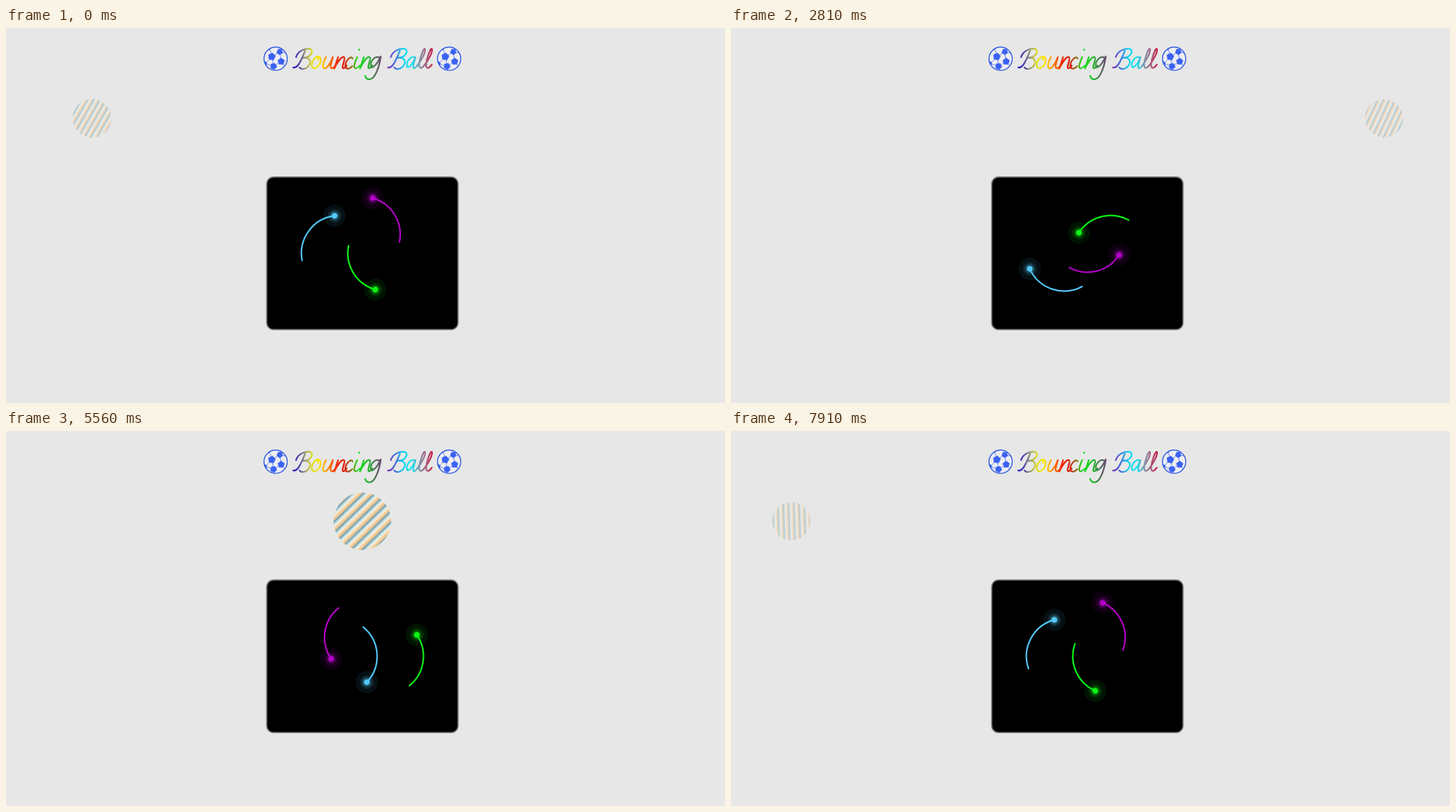
An HTML page that plays this animation: 1036x541 px, repeating every 8 s.

```html
<!DOCTYPE html>
<html lang="en">
<head>
<meta charset="utf-8">
<title>Bouncing Ball</title>
<style>
  html, body { margin: 0; width: 100%; height: 100%; overflow: hidden; background: #e7e7e7; }
  svg { position: absolute; left: 0; top: 0; display: block; }
  h1 {
    position: absolute; left: 413px; top: 24px; margin: 0; white-space: nowrap;
    font: italic 33px/44px Lato, sans-serif; color: transparent;
  }
  .ink { fill: none; stroke: #fff; stroke-width: 2.3; stroke-linecap: round; stroke-linejoin: round; }
</style>
</head>
<body>
<svg width="1036" height="541" viewBox="0 0 1036 541" aria-hidden="true">
  <defs>
    <linearGradient id="rainbow" gradientUnits="userSpaceOnUse" x1="413" y1="0" x2="615" y2="0"></linearGradient>
    <linearGradient id="stripes" gradientUnits="userSpaceOnUse" x1="0" y1="0" x2="7.600" y2="0" spreadMethod="repeat">
      <stop offset="0" stop-color="#f2efe2"/>
      <stop offset=".27" stop-color="#fac888"/>
      <stop offset=".4" stop-color="#e2c29a"/>
      <stop offset=".58" stop-color="#6f9fb0"/>
      <stop offset=".8" stop-color="#c6e0e2"/>
      <stop offset="1" stop-color="#f2efe2"/>
    </linearGradient>
    <clipPath id="round"><circle r="17"/></clipPath>
    <mask id="lettering" maskUnits="userSpaceOnUse" x="405" y="20" width="220" height="65">
      <g class="ink" id="title"></g>
    </mask>
    <g id="soccer">
      <circle r="16.8" fill="#ededf0"/>
      <g id="patches" clip-path="url(#round)" fill="#3b62f3" stroke="#3b62f3" stroke-width=".7"></g>
      <circle r="16.8" fill="none" stroke="#2f5be0" stroke-width="1.4"/>
    </g>
    <path id="capB" d="M0 57C6 58 10 50 17 33M4 42C6 34 16 29 23 30C31 31 26 43 14 43C24 42 26 48 23 53C20 59 12 61 9 57"/>
    <path id="n" d="M5.500 42L0 58.500C4 50 10 41 14 42C17 43 11 55 12 57C13 59.500 16 57 18 54"/>
    <path id="l" d="M0 54C7 46 13 33 11 30C9 28 2 48 3 55C4 60 8 57 11 53"/>
  </defs>

  <use href="#soccer" x="388.500" y="44.300"/>
  <use href="#soccer" x="638.500" y="44.300"/>
  <rect x="405" y="20" width="220" height="65" fill="url(#rainbow)" mask="url(#lettering)"/>

  <g id="ball"><circle r="27.500" fill="url(#stripes)"/></g>

  <rect x="375.600" y="214.800" width="275.800" height="220.400" rx="10" fill="#000" stroke="#808080" stroke-width="1.700"/>
  <g id="orbits"></g>
</svg>
<h1>Bouncing Ball</h1>

<script>
const NS = 'http://www.w3.org/2000/svg';
const $ = id => document.getElementById(id);
function add(parent, tag, attrs) {
  const el = document.createElementNS(NS, tag);
  for (const k in attrs) el.setAttribute(k, attrs[k]);
  return parent.appendChild(el);
}

// Title colours along its width
[[0, '#2418c8'], [.05, '#5048a8'], [.09, '#9a9a70'], [.14, '#e0e01c'], [.19, '#fbe800'],
 [.24, '#ff9a00'], [.31, '#f52a00'], [.37, '#e01808'], [.42, '#8a7010'], [.46, '#20e020'],
 [.53, '#1cc424'], [.58, '#467a50'], [.63, '#6a4a70'], [.69, '#7038c0'], [.74, '#3c7ae0'],
 [.79, '#10d8f0'], [.85, '#14e4f0'], [.9, '#7a98b0'], [.95, '#a86080'], [1, '#c81440']]
  .forEach(([offset, color]) => add($('rainbow'), 'stop', { offset, 'stop-color': color }));

// Title lettering
const title = $('title');
const glyph = (id, x) => add(title, 'use', { href: '#' + id, x });
const pen = d => add(title, 'path', { d });
glyph('capB', 414);
pen('M452 42C446 38 439 50 441 56C443 61 453 56 453.500 46C453 40 447 43 450 46');
pen('M461 42C458 48 455 56 458 58C462 60 468 50 471 42C469 49 466 57 469 58C471 59 473 56 474 55');
glyph('n', 473);
pen('M499.500 44C498 39 490 46 489 53C488 60 494 60 499 55');
pen('M506 42C503 49 500 57 503 58C505 59 508 56 510 54M509 31L508.800 31.800');
glyph('n', 510);
pen('M538 43C532 39 525 48 525.500 54C526 61 534 54 540 41C538 55 532 75 523 74C519 74 518 71 517.500 69');
glyph('capB', 550.5);
pen('M589 43C584 39 577 48 577.500 54C578 61 586 53 590 42C588 50 585 58 588 58C590 58 592 55 593 54');
glyph('l', 592.5);
glyph('l', 602.5);

// Soccer icon patches: x, y, radius, turn
[[-5.5, -3, 5.4, 10], [6, -10, 4.4, 40], [8, 4, 5, 0], [-3, 11, 4.8, 25], [-16, 7, 3.6, 0], [-10, -16, 3.4, 20], [16, 14, 3, 0]]
  .forEach(([x, y, r, turn]) => {
    const points = [0, 1, 2, 3, 4].map(i => {
      const a = (turn + i * 72 - 90) * Math.PI / 180;
      return (x + r * Math.cos(a)).toFixed(1) + ',' + (y + r * Math.sin(a)).toFixed(1);
    }).join(' ');
    add($('patches'), 'polygon', { points });
  });
add($('patches'), 'path', { d: 'M-5 -3L6 -10L8 4L-3 11L-5 -3L-15 7L-3 11M-5 -3L-9 -15M6 -10L15 -8M8 4L15 13', fill: 'none' });

// Orbiting lights: dir 1 is clockwise, sweep is the trail in degrees
const R = 54.5;
const lights = [
  { x: 513.5, y: 297.8, color: '#b400c8', start: -74, dir: -1, sweep: 85.5 },
  { x: 480.2, y: 325, color: '#52c8fa', start: -97.2, dir: 1, sweep: 94 },
  { x: 547, y: 325, color: '#0cf514', start: 106, dir: -1, sweep: 85.5 }
];
for (const s of lights) {
  s.el = add($('orbits'), 'g', { fill: s.color });
  const a = s.sweep * Math.PI / 180;
  add(s.el, 'path', {
    d: `M${R} 0A${R} ${R} 0 0 0 ${R * Math.cos(a)} ${-R * Math.sin(a)}`,
    fill: 'none', stroke: s.color, 'stroke-width': 2.2, 'stroke-linecap': 'round'
  });
  [[16, .08], [10, .11], [7, .24], [4.2, 1]]
    .forEach(([r, o]) => add(s.el, 'circle', { cx: R, r, 'fill-opacity': o }));
}

// Ball steps: time, x, radius, opacity, turn
const LOOP = 8000, LEAD = 90, TILT = -2;
const steps = [
  [0, 86.5, 27.5, .45, 0],
  [1040, 513.5, 32, .95, 360],
  [1784, 513.5, 41.5, 1, 540],
  [2824, 941, 27.5, .45, 900],
  [3851, 941, 27.5, .45, 1260],
  [4897, 513.5, 41.5, 1, 900],
  [5925, 513.5, 41.5, 1, 720],
  [6969, 86.5, 27.5, .45, 360],
  [8000, 86.5, 27.5, .45, 360]
];
function ballAt(t) {
  const i = steps.findIndex(s => s[0] > t);
  const a = steps[i - 1], b = steps[i];
  const k = (t - a[0]) / (b[0] - a[0]);
  return a.map((v, j) => v + (b[j] - v) * k);
}

function draw(t) {
  const [, x, r, opacity, turn] = ballAt((t + LEAD) % LOOP);
  $('ball').setAttribute('transform', `translate(${x} 130.200) rotate(${turn + TILT}) scale(${r / 27.5})`);
  $('ball').setAttribute('opacity', opacity);
  for (const s of lights) {
    const angle = s.start + s.dir * t * .09;
    s.el.setAttribute('transform', `translate(${s.x} ${s.y}) rotate(${angle}) scale(1 ${s.dir})`);
  }
}

const begin = performance.now();
function tick() {
  draw((performance.now() - begin) % LOOP);
  requestAnimationFrame(tick);
}
draw(0);
requestAnimationFrame(tick);
</script>
</body>
</html>
```
